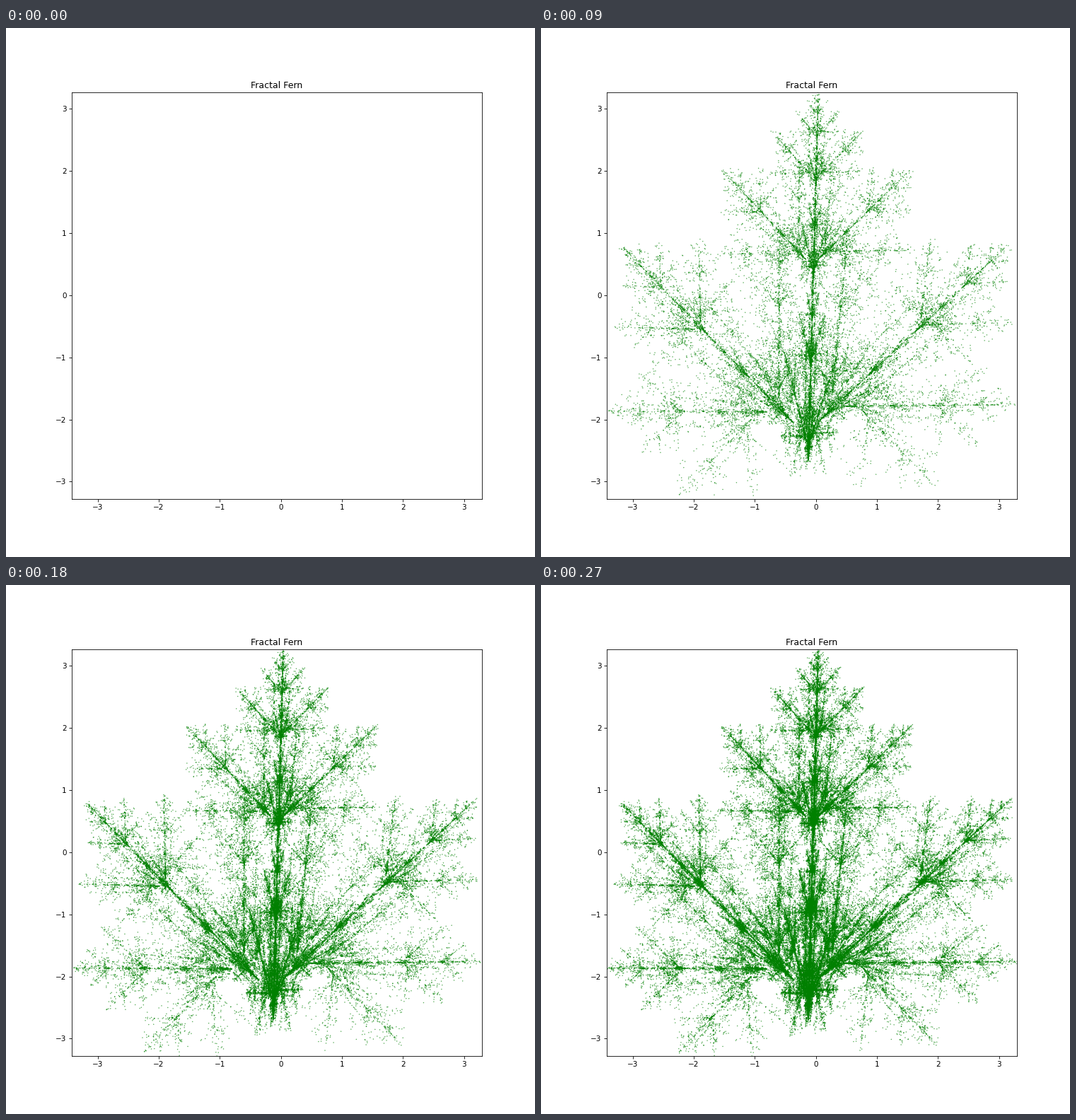
Write a matplotlib script that moves like this. It is 748 by 748 pixels and loops after 0.3 s.

```python
import random

import matplotlib.pyplot as plt
import numpy as np
from matplotlib.animation import FuncAnimation

SIZE = 748
FRAMES = 10
STEP = 10000  # points added per frame


def stem(x, y):
    return 0.14 * x + 0.01 * y - 0.08, 0.51 * y - 1.31


def right_lobe(x, y):
    return 0.43 * x + 0.52 * y + 1.49, -0.45 * x + 0.50 * y - 0.75


def left_lobe(x, y):
    return 0.45 * x - 0.49 * y - 1.62, 0.47 * x + 0.47 * y - 0.74


def top_lobe(x, y):
    return 0.49 * x + 0.02, 0.51 * y + 1.62


def chaos_game(count, seed=4):
    """Follow one point through randomly chosen maps."""
    rng = random.Random(seed)
    maps = (stem, right_lobe, left_lobe, top_lobe)
    x = y = 0.0
    points = np.empty((count, 2))
    for i in range(count):
        x, y = rng.choice(maps)(x, y)
        points[i] = x, y
    return points


points = chaos_game(FRAMES * STEP)

fig, ax = plt.subplots(figsize=(10, 10), dpi=SIZE / 10)
fig.subplots_adjust(left=93 / SIZE, right=673 / SIZE,
                    bottom=82 / SIZE, top=657 / SIZE)
ax.set_title("Fractal Fern")
ax.set_xlim(-3.423, 3.292)
ax.set_ylim(-3.280, 3.266)

# More than one size entry keeps the dots off the pixel grid.
dots = ax.scatter([], [], color="green")
dots.set_sizes([0.1, 0.1], fig.dpi)


def draw(frame):
    dots.set_offsets(points[:frame * STEP])
    return (dots,)


anim = FuncAnimation(fig, draw, frames=FRAMES, interval=30,
                     repeat=True, repeat_delay=0)
plt.show()
```
